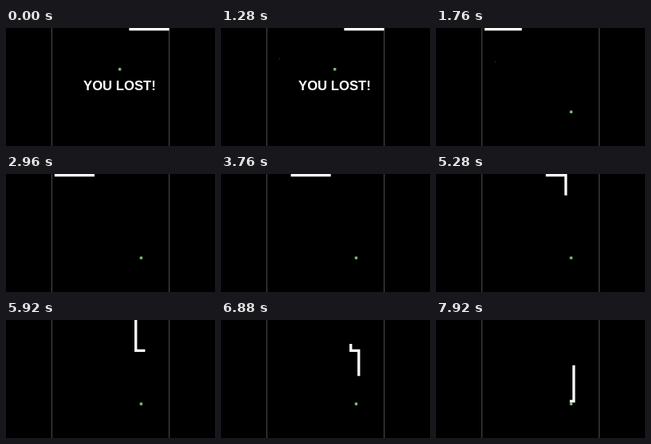
Write an HTML page that moves like this. It is 262x148 px and loops after 8000 ms.

```html
<!DOCTYPE html>
<html lang="en">
<head>
<meta charset="utf-8">
<title>Snake</title>
<style>
  html, body { margin: 0; width: 100%; height: 100%; overflow: hidden; background: #000; }
  svg { display: block; width: 262px; height: 148px; }
  .wall { fill: #4a4a4a; }
  #food { fill: #7dbb76; }
  #pointer { fill: #3c403c; }
  #snake { fill: none; stroke: #fff; stroke-width: 3.34; stroke-linecap: square; stroke-linejoin: miter; }
  #lost { fill: #fff; font: bold 16.7px "Liberation Sans", Arial, sans-serif; }
</style>
</head>
<body>
<svg viewBox="0 0 262 148">
  <rect class="wall" x="57" width="1" height="148"/>
  <rect class="wall" x="204" width="1" height="148"/>
  <rect id="food" width="3.34" height="3.34"/>
  <path id="snake"/>
  <text id="lost" x="97" y="78">YOU LOST!</text>
  <rect id="pointer" width="1" height="1"/>
</svg>
<script>
const LOOP = 8000, TICK = 80, CELL = 3.34, LEFT = 57.5, LENGTH = 15;
const RESET = 19, START = 36;
// Ticks on which the snake waits.
const PAUSES = [39, 46, 51, 55, 61, 65, 70, 75, 80, 85, 90, 95];
const ROUTE = [[31, 0], [31, 11], [34, 11], [34, 30], [33, 30]];
// Pointer path: tick, x, y.
const POINTER = [[4, 156, 141], [8, 122, 78], [10, 99, 38], [11, 95, 36],
  [13, 90, 37], [16, 73, 38], [20, 77, 41], [22, 74, 42], [27, 58, 37], [31, 58, 37]];

const [food, snake, lost, pointer] =
  ['food', 'snake', 'lost', 'pointer'].map(id => document.getElementById(id));
const px = col => LEFT + col * CELL;
const set = (el, attrs) => { for (const k in attrs) el.setAttribute(k, attrs[k]); };
const show = (el, on) => { el.style.visibility = on ? 'visible' : 'hidden'; };

// Cell reached after n steps along the route.
function cellAt(n) {
  let x = 1, y = 0, left = Math.max(0, 13 + n);
  for (const [tx, ty] of ROUTE) {
    const dist = Math.abs(tx - x) + Math.abs(ty - y);
    const move = Math.min(left, dist);
    x += Math.sign(tx - x) * move;
    y += Math.sign(ty - y) * move;
    left -= move;
    if (!left) break;
  }
  return [x, y];
}

function bodyAt(tick) {
  if (tick < RESET) return [[29, 0], [43, 0]];
  const steps = Math.max(0, tick - START - PAUSES.filter(p => p <= tick).length);
  return Array.from({ length: LENGTH }, (_, i) => cellAt(steps - LENGTH + 1 + i));
}

function drawPointer(tick) {
  const i = POINTER.findIndex(p => p[0] > tick);
  show(pointer, i > 0);
  if (i < 1) return;
  const [t0, x0, y0] = POINTER[i - 1], [t1, x1, y1] = POINTER[i];
  const k = (tick - t0) / (t1 - t0);
  set(pointer, { x: Math.round(x0 + (x1 - x0) * k), y: Math.round(y0 + (y1 - y0) * k) });
}

function draw(now) {
  const tick = Math.floor(now % LOOP / TICK);
  const over = tick < RESET;
  const [fx, fy] = over ? [25, 15] : [33, 31];
  set(food, { x: px(fx), y: fy * CELL });
  const points = bodyAt(tick).map(([x, y]) => `${px(x + 0.5)} ${(y + 0.5) * CELL}`);
  set(snake, { d: 'M' + points.join('L') });
  show(lost, over);
  drawPointer(tick);
}

const begin = performance.now();
function loop() {
  draw(performance.now() - begin);
  requestAnimationFrame(loop);
}
loop();
</script>
</body>
</html>
```
